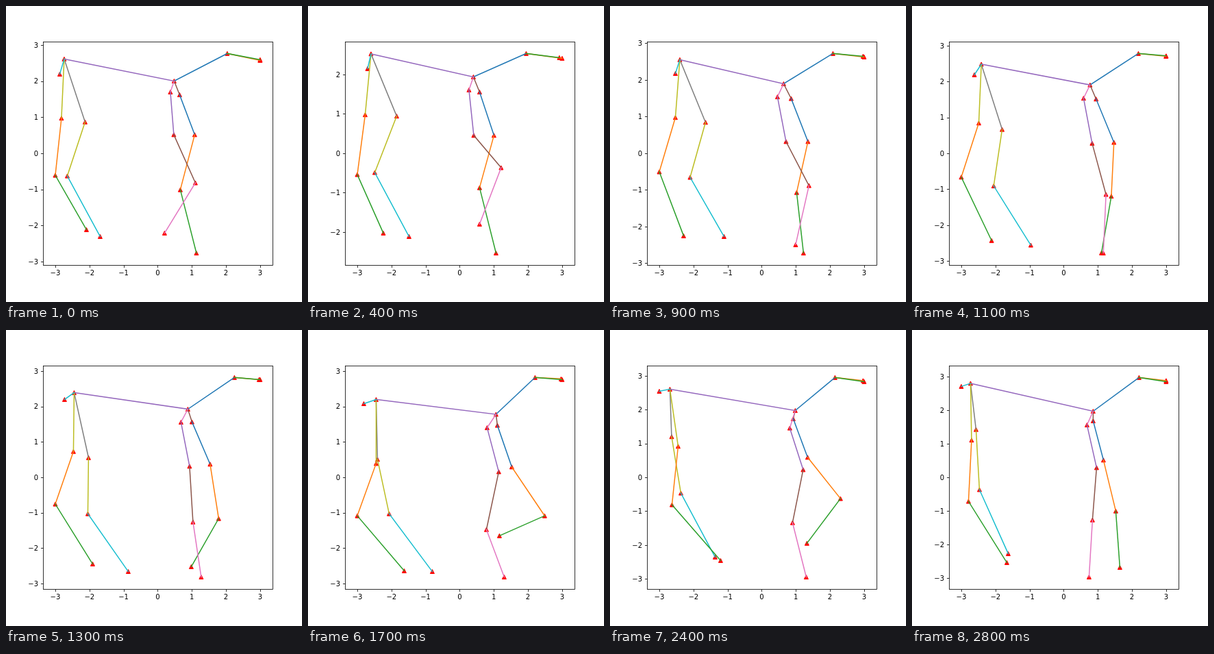
Animation, 432 px wide and 432 px high, one loop 2.9 s. Source, as an HTML page with a canvas:

```html
<!DOCTYPE html>
<html lang="en">
<head>
<meta charset="utf-8">
<style>
html, body { margin: 0; width: 100%; height: 100%; overflow: hidden; background: #fff; }
canvas { display: block; }
</style>
</head>
<body>
<canvas id="stage" width="432" height="432"></canvas>
<script>
const ctx = document.getElementById('stage').getContext('2d');
const LOOP = 2900, STEP = 100;
const AXES = { left: 54, right: 388.8, top: 51.84, bottom: 378 };
const MID_X = (AXES.left + AXES.right) / 2, MID_Y = (AXES.top + AXES.bottom) / 2;
const HALF_X = (AXES.right - AXES.left) / 2, HALF_Y = (AXES.bottom - AXES.top) / 2;
const MARGIN = 1.12, X_UNIT = HALF_X / MARGIN / 3;
const POSE_TIMES = [0, 400, 900, 1300, 1700, 2400, 2800];
const [BLUE, ORANGE, GREEN, PURPLE, BROWN, PINK, GRAY, OLIVE, CYAN] =
  ['#1f77b4', '#ff7f0e', '#2ca02c', '#9467bd', '#8c564b', '#e377c2', '#7f7f7f', '#bcbd22', '#17becf'];

// Cubic Hermite spline through values at uneven times
function spline(values, times = POSE_TIMES) {
  const last = values.length - 1;
  const slope = i => (values[i + 1] - values[i]) / (times[i + 1] - times[i]);
  const tangent = i => {
    if (i === 0) return slope(0);
    if (i === last) return slope(last - 1);
    const before = times[i] - times[i - 1], after = times[i + 1] - times[i];
    return (slope(i - 1) * after + slope(i) * before) / (before + after);
  };
  return t => {
    let i = 0;
    while (i < last - 1 && t >= times[i + 1]) i++;
    const span = times[i + 1] - times[i], u = (t - times[i]) / span, v = 1 - u;
    return v * v * ((1 + 2 * u) * values[i] + u * span * tangent(i)) +
           u * u * ((3 - 2 * u) * values[i + 1] - v * span * tangent(i + 1));
  };
}

const joints = [];
function joint(parent, color, xs, ys) {
  const made = { parent, color, x: spline(xs), y: spline(ys) };
  joints.push(made);
  return made;
}

const neck = joint(null, null,
  [245.5, 241.5, 253.5, 265.5, 274.5, 270.5, 264.5], [110, 104, 114, 116, 123.5, 118, 119]);
const head = joint(neck, BLUE,
  [323, 318.5, 325.5, 333.5, 331.5, 328.5, 331.5], [70, 70, 70, 70, 70, 70, 70]);
joint(head, ORANGE,
  [371, 371, 371, 369.5, 369.5, 369.5, 371], [80, 77, 75, 73, 72, 74.5, 74.5]);
joint(head, GREEN,
  [371, 367, 369.5, 371, 371, 371, 371], [79, 76, 74, 73, 73, 76, 76]);
const hip = joint(neck, PURPLE,
  [85, 92, 102, 99.5, 99.5, 87.5, 85.5], [78, 70.5, 79, 92, 102, 87, 78.5]);
const shoulderR = joint(neck, BROWN,
  [253.5, 250.5, 264.5, 271.5, 276.5, 267.5, 264.5], [130, 126, 135.5, 134.5, 139.5, 130, 133]);
const shoulderL = joint(neck, PINK,
  [240, 235, 244.5, 255.5, 261.5, 262.5, 255.5], [126, 123, 133, 135, 143, 143.5, 139]);
const kneeR = joint(hip, GRAY,
  [115.5, 129.5, 139.5, 120.5, 101.5, 90, 93.5], [169.5, 161, 170, 186.5, 189, 156, 145.5]);
const kneeL = joint(hip, OLIVE,
  [81, 83.5, 95.5, 98.5, 99.5, 99.5, 87], [164, 159, 163, 177.5, 195, 170, 161]);
joint(hip, CYAN,
  [78.5, 87, 95.5, 85.5, 81.5, 72, 72], [100, 92, 99, 102, 108, 90, 83]);

const elbowR = joint(shoulderR, BLUE,
  [275.5, 271.5, 289, 298, 297.5, 288.5, 279.5], [188, 189, 198, 196, 200, 186, 190]);
const wristR = joint(elbowR, ORANGE,
  [254.5, 250.5, 272.5, 310.5, 345.5, 336.5, 297.5], [268, 265, 272, 275, 271, 246, 264]);
joint(wristR, GREEN,
  [278, 274.5, 282.5, 270.5, 279.5, 287.5, 303.5], [360, 360, 360, 345, 300, 311, 346]);

const elbowL = joint(shoulderL, PURPLE,
  [245, 242, 257, 268, 278.5, 282, 269.5], [188, 189, 198, 199, 207, 204, 201]);
const wristL = joint(elbowL, BROWN,
  [276.5, 282, 290.5, 273, 260.5, 266.5, 263.5], [258, 236, 262, 280, 291, 281, 277]);
joint(wristL, PINK,
  [231.5, 250.5, 271, 285, 286.5, 286.5, 258.5], [331, 318, 348, 360, 360, 360, 360]);

const ankleR = joint(kneeR, OLIVE,
  [89.5, 97.5, 117, 119.5, 118.5, 103.5, 98.5], [248, 243, 250, 268, 268, 238, 233]);
joint(ankleR, CYAN,
  [137.5, 147.5, 166.5, 178.5, 181.5, 153.5, 140.5], [336, 336, 336, 352, 352, 331, 326]);
const ankleL = joint(kneeL, ORANGE,
  [72, 72, 72, 72, 72, 90.5, 82.5], [247, 246, 242, 254, 271, 255, 250]);
joint(ankleL, GREEN,
  [117.5, 110, 107.5, 126.5, 140.5, 161.5, 138.5], [326, 331, 335, 341, 351, 336, 339]);

const yUnit = spline([52.67, 57.5, 53.5, 51.67, 51.67, 51, 49.4, 50.2, 49],
  [0, 400, 900, 1300, 1700, 1900, 2400, 2600, 2800]);

// Rescale so the extremes always touch the same limits
function fit(values, middle, half) {
  const low = Math.min(...values), high = Math.max(...values);
  return values.map(v => middle + half * (2 * (v - low) / (high - low) - 1));
}

const snap = v => Math.floor(v + 0.5) + 0.5;

function line(x1, y1, x2, y2) {
  ctx.beginPath();
  ctx.moveTo(x1, y1);
  ctx.lineTo(x2, y2);
  ctx.stroke();
}

function drawAxes(unit) {
  const left = snap(AXES.left), bottom = snap(AXES.bottom), top = snap(AXES.top);
  ctx.strokeStyle = ctx.fillStyle = '#000';
  ctx.lineWidth = 0.8;
  ctx.lineCap = 'butt';
  ctx.font = '10px "DejaVu Sans", sans-serif';
  ctx.strokeRect(left, top, snap(AXES.right) - left, bottom - top);
  for (let n = -3; n <= 3; n++) {
    const label = String(n).replace('-', '\u2212');
    const x = MID_X + n * X_UNIT, y = MID_Y - n * unit;
    line(snap(x), bottom, snap(x), bottom + 3.5);
    ctx.textAlign = 'center';
    ctx.fillText(label, x, 393);
    if (Math.abs(n * unit) > HALF_Y) continue;
    line(left - 3.5, snap(y), left, snap(y));
    ctx.textAlign = 'right';
    ctx.fillText(label, 47, Math.round(y + 3.8));
  }
}

function drawMarker(x, y) {
  ctx.beginPath();
  ctx.moveTo(x, y - 3);
  ctx.lineTo(x - 3, y + 3);
  ctx.lineTo(x + 3, y + 3);
  ctx.closePath();
  ctx.fill();
  ctx.stroke();
}

function drawSkeleton(t) {
  const xs = fit(joints.map(j => j.x(t)), MID_X, HALF_X / MARGIN);
  const ys = fit(joints.map(j => j.y(t)), MID_Y, HALF_Y / MARGIN);
  ctx.fillStyle = ctx.strokeStyle = '#f00';
  ctx.lineWidth = 1;
  joints.forEach((_, i) => drawMarker(xs[i], ys[i]));
  ctx.lineWidth = 1.5;
  ctx.lineCap = 'square';
  joints.forEach(({ parent, color }, i) => {
    if (!parent) return;
    const p = joints.indexOf(parent);
    ctx.strokeStyle = color;
    line(xs[p], ys[p], xs[i], ys[i]);
  });
}

function render() {
  const t = Math.floor(performance.now() % LOOP / STEP) * STEP;
  ctx.fillStyle = '#fff';
  ctx.fillRect(0, 0, 432, 432);
  drawSkeleton(t);
  drawAxes(yUnit(t));
  requestAnimationFrame(render);
}
render();
</script>
</body>
</html>
```
